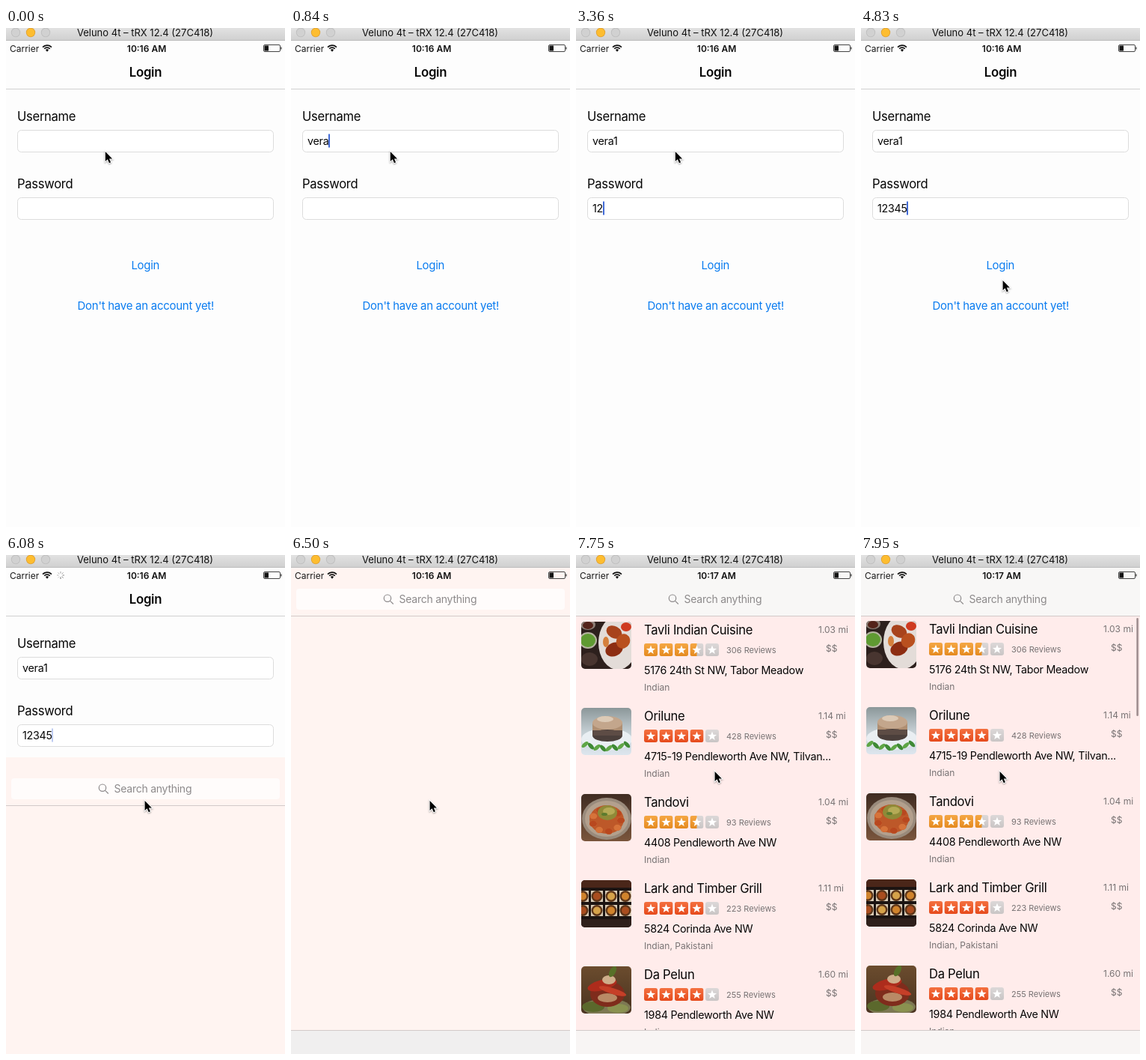
An HTML page with a canvas that plays this animation: 373 by 666 pixels, repeating every 8000 ms.

```html
<!DOCTYPE html>
<html lang="en">
<head>
<meta charset="utf-8">
<title>Login flow</title>
<style>
  html, body { margin: 0; width: 100%; height: 100%; overflow: hidden; background: #fdfdfd; }
  canvas { display: block; width: 373px; height: 666px; }
</style>
</head>
<body>
<canvas id="stage"></canvas>
<script>
const W = 373, H = 666, LOOP = 8000;
const FONT = 'Inter, Roboto, "Liberation Sans", sans-serif';
const TIGHT = -0.018;
const INK = '#060606', BLUE = '#0a7cf0', GRAY = '#777273';

const canvas = document.getElementById('stage');
const ctx = canvas.getContext('2d');
const dpr = window.devicePixelRatio || 1;
canvas.width = W * dpr;
canvas.height = H * dpr;

const places = [
  { name: 'Tavli Indian Cuisine', stars: 3.5, reviews: 306, miles: '1.03', street: '5176 24th St NW, Tabor Meadow', kind: 'Indian' },
  { name: 'Orilune', stars: 4, reviews: 428, miles: '1.14', street: '4715-19 Pendleworth Ave NW, Tilvan...', kind: 'Indian' },
  { name: 'Tandovi', stars: 3.5, reviews: 93, miles: '1.04', street: '4408 Pendleworth Ave NW', kind: 'Indian' },
  { name: 'Lark and Timber Grill', stars: 4, reviews: 223, miles: '1.11', street: '5824 Corinda Ave NW', kind: 'Indian, Pakistani' },
  { name: 'Da Pelun', stars: 4, reviews: 255, miles: '1.60', street: '1984 Pendleworth Ave NW', kind: 'Indian' }
];

// Value of the last [time, value] pair already reached.
function held(t, steps) {
  let value = steps[0][1];
  for (const [at, v] of steps) if (t >= at) value = v;
  return value;
}

function rect(x, y, w, h, color) {
  ctx.fillStyle = color;
  ctx.fillRect(x, y, w, h);
}

function shade(y, h, ...colors) {
  const g = ctx.createLinearGradient(0, y, 0, y + h);
  colors.forEach((c, i) => g.addColorStop(i / (colors.length - 1), c));
  return g;
}

function roundPath(x, y, w, h, r) {
  ctx.beginPath();
  ctx.roundRect(x, y, w, h, r);
}

function oval(color, x, y, rx, ry = rx, turn = 0) {
  ctx.fillStyle = color;
  ctx.beginPath();
  ctx.ellipse(x, y, rx, ry, turn, 0, Math.PI * 2);
  ctx.fill();
}

function poly(points, color) {
  ctx.fillStyle = color;
  ctx.beginPath();
  for (const [x, y] of points) ctx.lineTo(x, y);
  ctx.closePath();
  ctx.fill();
}

function text(str, x, y, size, color, { align = 'left', weight = 400, track = 0 } = {}) {
  ctx.font = `${weight} ${size}px ${FONT}`;
  ctx.letterSpacing = `${track * size}px`;
  ctx.textAlign = align;
  ctx.fillStyle = color;
  ctx.fillText(str, x, y);
  return ctx.measureText(str).width;
}

function titleBar() {
  rect(0, 0, W, 17, shade(0, 17, '#e2e2e2', '#cfcfcf'));
  rect(0, 16, W, 1, '#bcbcbc');
  ['#d1d1d1', '#fdbd30', '#d1d1d1'].forEach((color, i) => {
    oval(i === 1 ? '#dfa032' : '#bdbdbd', 13 + i * 20, 6, 6.2);
    oval(color, 13 + i * 20, 6, 5.4);
  });
  text('Veluno 4t – tRX 12.4 (27C418)', 186, 11, 13, '#111', { align: 'center' });
}

function spinner(turn) {
  ctx.lineWidth = 1;
  for (let i = 0; i < 8; i++) {
    const a = (i + turn) * Math.PI / 4;
    ctx.strokeStyle = `rgba(60,60,60,${0.25 + i * 0.07})`;
    ctx.beginPath();
    ctx.moveTo(73 + 2.4 * Math.cos(a), 27 + 2.4 * Math.sin(a));
    ctx.lineTo(73 + 5 * Math.cos(a), 27 + 5 * Math.sin(a));
    ctx.stroke();
  }
}

function statusBar(t) {
  text('Carrier', 5, 31.5, 12, '#1a1a1a');
  ctx.strokeStyle = '#111';
  ctx.lineWidth = 1.7;
  for (const r of [5.2, 8.2]) {
    ctx.beginPath();
    ctx.arc(55, 31.3, r, -Math.PI * 0.76, -Math.PI * 0.24);
    ctx.stroke();
  }
  poly([[55, 31.8], [52.8, 29], [55, 28.1], [57.2, 29]], '#111');
  text(t < 7750 ? '10:16 AM' : '10:17 AM', 188, 31.5, 12, '#111', { align: 'center', weight: 600 });
  ctx.strokeStyle = '#444';
  ctx.lineWidth = 1;
  roundPath(344.5, 22.5, 22, 9, 1.5);
  ctx.stroke();
  rect(345.5, 23.5, 5.5, 7, '#111');
  rect(367.3, 25.5, 1.3, 3, '#444');
  if (t >= 5870 && t < 6500) spinner(Math.floor((t - 5870) / 210) * 3);
}

function field(label, y, value, caret) {
  text(label, 15, y - 12.4, 16.6, INK, { track: TIGHT });
  ctx.strokeStyle = '#dcdcdc';
  ctx.lineWidth = 1;
  ctx.fillStyle = '#fff';
  roundPath(15.5, y + 0.5, 342, 29, 5);
  ctx.fill();
  ctx.stroke();
  const width = text(value, 22, y + 19.5, 14.3, INK, { track: TIGHT });
  if (caret) {
    ctx.globalAlpha = caret;
    rect(Math.round(22 + width - 0.5), y + 5.5, 2, 18, '#426bd6');
    ctx.globalAlpha = 1;
  }
}

function loginScreen(t) {
  rect(0, 17, W, H, '#fdfdfd');
  rect(0, 81, W, 1, '#d0d0d0');
  text('Login', 186.5, 65, 16.8, INK, { align: 'center', weight: 600, track: TIGHT });

  const user = held(t, [[0, 0], [210, 1], [420, 2], [630, 3], [840, 4], [1470, 5]]);
  const pass = held(t, [[0, 0], [3150, 1], [3360, 2], [3780, 3], [3990, 4], [4410, 5]]);
  const blink = held(t, [[0, 0], [210, 1], [2100, 0.3], [2310, 1], [2730, 0.3], [2940, 0],
    [3150, 1], [5040, 0.3], [5250, 0], [5460, 1], [6080, 0.35]]);
  field('Username', 136, 'vera1'.slice(0, user), t < 2310 ? blink : 0);
  field('Password', 226, '12345'.slice(0, pass), t < 2310 ? 0 : blink);

  ctx.globalAlpha = held(t, [[0, 1], [5460, 0.3], [5660, 0.75], [5870, 1]]);
  text('Login', 186.3, 321.5, 15, BLUE, { align: 'center', track: TIGHT });
  ctx.globalAlpha = 1;
  text("Don't have an account yet!", 186.8, 375.5, 15, BLUE, { align: 'center', track: TIGHT });
}

const photos = [
  () => {
    rect(0, 0, 67, 63, '#2d201d');
    oval('#8d8078', 9, 4, 10, 7);
    oval('#54231a', 9, 5, 7, 5);
    oval('#b5b3a0', 9, 25, 12, 11);
    oval('#5f9a32', 9, 25, 10, 9);
    oval('#483530', 11, 50, 11, 9);
    oval('#e3dcd8', 49, 28, 26, 36);
    oval('#a8431c', 44, 14, 11, 8, 0.5);
    oval('#8d2d12', 44, 37, 12, 9, -0.4);
    oval('#b9501f', 56, 26, 9, 10, 0.5);
    oval('#cf3a20', 60, 7, 7, 6);
    oval('#d5803c', 33, 27, 4, 7);
  },
  () => {
    rect(0, 0, 67, 63, shade(0, 63, '#8b9799', '#c3cdd2', '#dde6ee'));
    oval('#e9eef2', 34, 42, 34, 15);
    rect(15, 20, 40, 16, '#b08f72');
    oval('#4b3f3b', 35, 37, 20, 8);
    rect(15, 30, 40, 7, '#5d4c45');
    oval('#c3a68c', 35, 20, 20, 9);
    oval('#dccab6', 32, 15, 11, 4);
    for (let i = 0; i < 8; i++) oval(i % 2 ? '#3f8a35' : '#5fa646', 5 + i * 8, 49 + 5 * Math.sin(i * 0.45), 5.5, 2.6, i % 2 ? 0.8 : -0.7);
  },
  () => {
    rect(0, 0, 67, 63, shade(0, 63, '#3f2c22', '#7a553c'));
    oval('#998a7b', 34, 33, 33, 28);
    oval('#b3a08d', 34, 33, 29, 24);
    oval('#bd5829', 34, 34, 23, 19);
    for (let i = 0; i < 18; i++) oval(i % 2 ? '#b8481f' : '#d6733a', 34 + 19 * Math.cos(i * 0.7), 35 + 15 * Math.sin(i * 0.7), 5, 4);
    oval('#8f8a38', 35, 25, 13, 10);
    oval('#b5aa56', 37, 23, 8, 5);
    oval('#5c7b2e', 31, 27, 4, 2);
  },
  () => {
    rect(0, 0, 67, 63, '#1c1412');
    rect(0, 0, 67, 10, '#4a2619');
    for (let i = 0; i < 8; i++) {
      const x = -6 + (i % 4) * 19, y = i < 4 ? 14 : 33;
      rect(x, y, 16, 15, '#d9cdb8');
      oval('#5d3518', x + 8, y + 7.5, 7.5);
      oval(['#d0832c', '#a94d1f', '#d5a24a'][i % 3], x + 8, y + 7.5, 5);
    }
    rect(0, 52, 67, 11, '#2f201b');
  },
  () => {
    rect(0, 0, 67, 63, shade(0, 63, '#6b4c2e', '#4a3320'));
    oval('#7d7853', 34, 55, 32, 12);
    oval('#5b682c', 16, 54, 15, 7);
    oval('#8a9150', 49, 56, 14, 6);
    oval('#7f2c1c', 35, 37, 23, 17);
    oval('#b98a66', 35, 42, 13, 6);
    oval('#ad2c1c', 28, 25, 20, 7, -0.25);
    oval('#c63f28', 42, 33, 19, 4, 0.3);
    oval('#cfae8b', 37, 18, 9, 6);
    oval('#587028', 42, 7, 4, 8, 0.5);
  }
];

function star(x, y, fill, colors) {
  const tile = (w, [top, bottom]) => {
    ctx.save();
    ctx.beginPath();
    ctx.rect(x, y, w, 17);
    ctx.clip();
    ctx.fillStyle = shade(y, 17, top, bottom);
    roundPath(x, y, 18, 17, 3);
    ctx.fill();
    ctx.restore();
  };
  tile(18, ['#dcd8d8', '#c9c5c5']);
  if (fill > 0) tile(18 * fill, colors);
  const points = [];
  for (let i = 0; i < 10; i++) {
    const r = i % 2 ? 2.7 : 6.4, a = i * Math.PI / 5 - Math.PI / 2;
    points.push([x + 9 + r * Math.cos(a), y + 8.9 + r * Math.sin(a)]);
  }
  poly(points, '#fff');
}

function row(place, i, y) {
  ctx.save();
  ctx.translate(7, y + 7);
  roundPath(0, 0, 67, 63, 5);
  ctx.clip();
  photos[i]();
  ctx.restore();

  text(place.name, 91, y + 24, 16.6, INK, { track: TIGHT });
  const colors = place.stars > 3.5 ? ['#f4703f', '#e64a1c'] : ['#f5a744', '#e58a1f'];
  for (let s = 0; s < 5; s++) {
    star(91 + s * 20.5, y + 36, Math.min(1, Math.max(0, place.stars - s)), colors);
  }
  text(`${place.reviews} Reviews`, 201, y + 48.5, 11, GRAY);
  text(place.street, 91, y + 77, 14.3, INK, { track: TIGHT });
  text(place.kind, 91, y + 99, 12, GRAY);
  text(`${place.miles} mi`, 324, y + 22, 12, GRAY);
  text('$$', 334, y + 47, 12, GRAY);
}

function searchBar(boxed) {
  if (boxed) {
    ctx.fillStyle = '#fffcfb';
    roundPath(7, 45, 359, 28, 4);
    ctx.fill();
  }
  ctx.strokeStyle = '#8d8a8b';
  ctx.lineWidth = 1.2;
  ctx.beginPath();
  ctx.arc(129, 57.7, 4.7, 0, Math.PI * 2);
  ctx.moveTo(132.4, 61.1);
  ctx.lineTo(136.8, 65.5);
  ctx.stroke();
  text('Search anything', 144.5, 63.5, 14, '#8d8a8b', { track: TIGHT });
}

function resultsScreen(t) {
  const loaded = t >= 6700;
  const drop = held(t, [[0, 253], [6290, 5], [6500, 0]]);
  ctx.save();
  ctx.translate(0, drop);
  rect(0, 17, W, H, loaded ? '#ffeceb' : '#fff4f1');
  if (loaded) {
    const scroll = t >= 7950 ? 1 : 0;
    places.forEach((place, i) => row(place, i, 82 + i * 115 - scroll));
    rect(0, 17, W, 64, '#f8f7f6');
    if (scroll) {
      ctx.fillStyle = '#a08f90';
      roundPath(368.3, 84, 2.6, 131, 1.3);
      ctx.fill();
    }
  }
  searchBar(!loaded);
  rect(0, 81, W, 1, '#d2cac9');
  rect(0, 634, W, 32, loaded ? '#f8f5f4' : '#f0efef');
  rect(0, 634, W, 1, '#d2cac9');
  ctx.restore();
}

function pointer(x, y) {
  ctx.save();
  ctx.translate(x, y);
  ctx.beginPath();
  for (const [px, py] of [[0, 0], [0, 13], [3, 10.3], [5.2, 15.2], [7.3, 14.3], [5.2, 9.6], [9.3, 9.6]]) ctx.lineTo(px, py);
  ctx.closePath();
  ctx.shadowColor = 'rgba(0,0,0,.35)';
  ctx.shadowBlur = 2 * dpr;
  ctx.shadowOffsetY = dpr;
  ctx.strokeStyle = '#fff';
  ctx.lineWidth = 2;
  ctx.stroke();
  ctx.shadowColor = 'transparent';
  ctx.fillStyle = '#000';
  ctx.fill();
  ctx.restore();
}

function draw(t) {
  ctx.setTransform(dpr, 0, 0, dpr, 0, 0);
  loginScreen(t);
  if (t >= 6080) resultsScreen(t);
  titleBar();
  statusBar(t);
  pointer(...held(t, [[0, [132.8, 165]], [4830, [189.6, 337]], [5040, [185.6, 328]], [7750, [185.6, 289]]]));
}

const start = performance.now();
function frame() {
  draw((performance.now() - start) % LOOP);
  requestAnimationFrame(frame);
}
frame();
</script>
</body>
</html>
```
